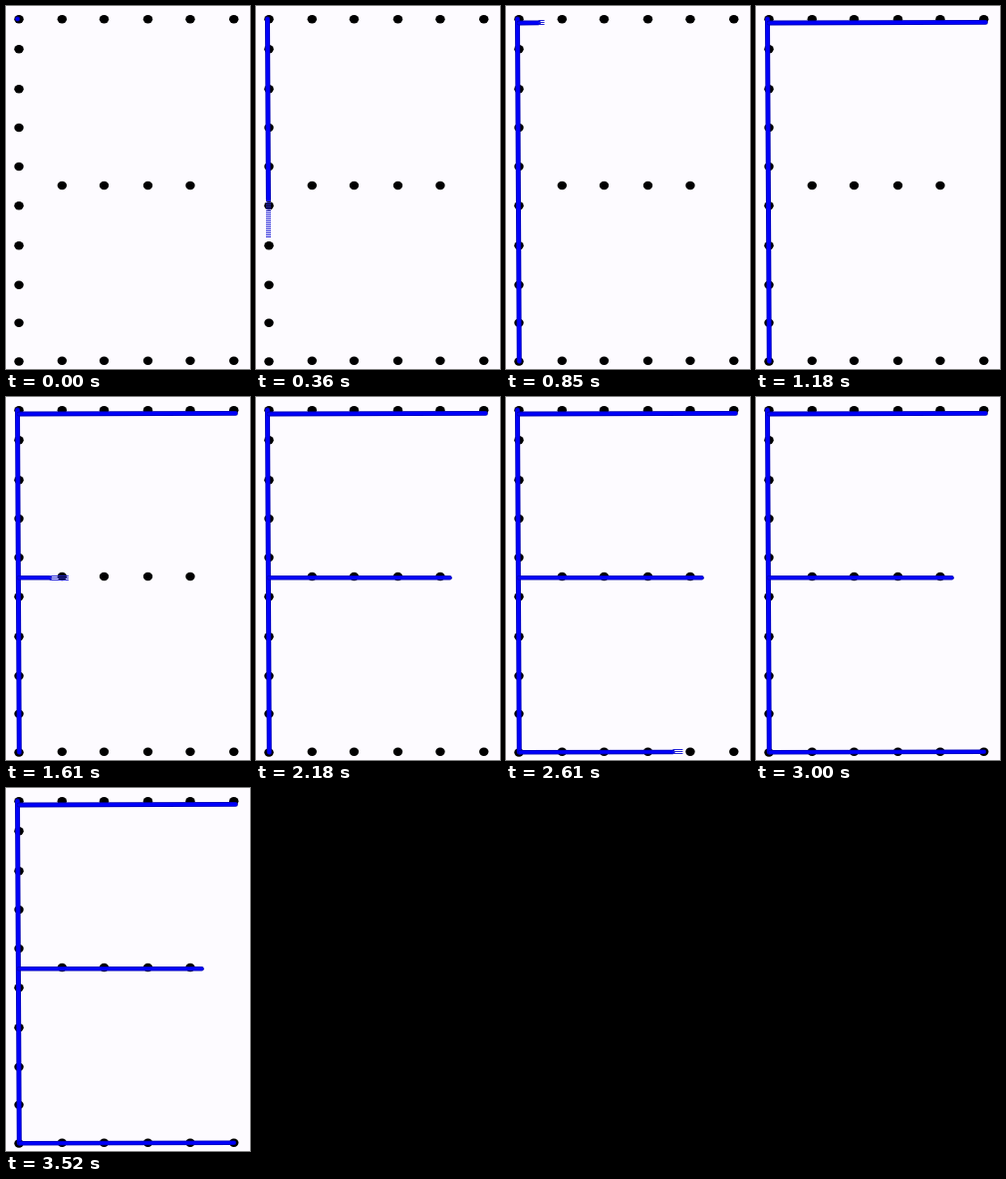
Animation, 245 px wide and 364 px high, one loop 3560 ms. Source, as an HTML page with a canvas:

```html
<!DOCTYPE html>
<html lang="en">
<head>
<meta charset="utf-8">
<title>Letter E stroke order</title>
<style>
  html, body { margin: 0; height: 100%; overflow: hidden; background: #fdfbff; }
  canvas { display: block; }
</style>
</head>
<body>
<canvas id="stage" width="245" height="364"></canvas>
<script>
const ctx = document.getElementById('stage').getContext('2d');
const LOOP = 3560;
const columns = [56.3, 98.5, 142.5, 185, 228.8];
const dots = [
  ...[13.3, 43.3, 83.3, 122, 161, 200.2, 240.2, 279.7, 317.8, 356.5].map(y => [13, y]),
  ...columns.map(x => [x, 13.3]),
  ...columns.slice(0, 4).map(x => [x, 180]),
  ...columns.map(x => [x, 355.8])
];

// Speed is in pixels per ms; feather is the length of the striped leading edge.
const strokes = [
  { from: [11.5, 13], to: [13.3, 356.3], start: -1, speed: 0.605, feather: 38, width: 5 },
  { from: [13, 17], to: [230.5, 16.4], start: 815, speed: 0.71, feather: 6, width: 4.8 },
  { from: [13, 181.3], to: [196.5, 181.3], start: 1528, speed: 0.6, feather: 19, width: 4.5, settle: 2200 },
  { from: [14, 356.2], to: [229, 355.8], start: 2284, speed: 0.5, feather: 10, width: 4.5 }
];

function line(from, to, width, color) {
  ctx.lineWidth = width;
  ctx.strokeStyle = color;
  ctx.beginPath();
  ctx.moveTo(...from);
  ctx.lineTo(...to);
  ctx.stroke();
}

function drawFeather(x, y, length, vertical) {
  ctx.fillStyle = '#2424d8';
  if (vertical) {
    for (let d = 1; d < length; d += 2) ctx.fillRect(Math.floor(x) - 2, Math.round(y + d), 5, 1);
  } else {
    for (let row = -2; row <= 2; row += 2) ctx.fillRect(x, Math.floor(y) + row, length, 1);
  }
}

function drawStroke({ from, to, start, speed, feather, width, settle = 0 }, t) {
  if (t < start) return;
  const dx = to[0] - from[0], dy = to[1] - from[1];
  const full = Math.hypot(dx, dy);
  const limit = t < settle ? full - 2 : full;
  const tip = (t - start) * speed;
  const solid = Math.min(Math.max(tip - feather, 0.1), limit);
  const end = [from[0] + dx * solid / full, from[1] + dy * solid / full];
  line(from, end, width, '#0000b4');
  line(from, end, width - 1.6, '#0000fa');
  if (solid < limit && tip > 2) {
    drawFeather(...end, Math.min(tip, full) - solid, dy > dx);
  }
}

function draw(now) {
  const t = now % LOOP;
  ctx.fillStyle = '#fdfbff';
  ctx.fillRect(0, 0, 245, 364);
  ctx.fillStyle = '#000';
  for (const [x, y] of dots) {
    ctx.beginPath();
    ctx.ellipse(x, y, 4.7, 4.2, 0, 0, Math.PI * 2);
    ctx.fill();
  }
  ctx.lineCap = 'round';
  for (const stroke of strokes) drawStroke(stroke, t);
}

const began = performance.now();
function tick() {
  draw(performance.now() - began);
  requestAnimationFrame(tick);
}
tick();
</script>
</body>
</html>
```
